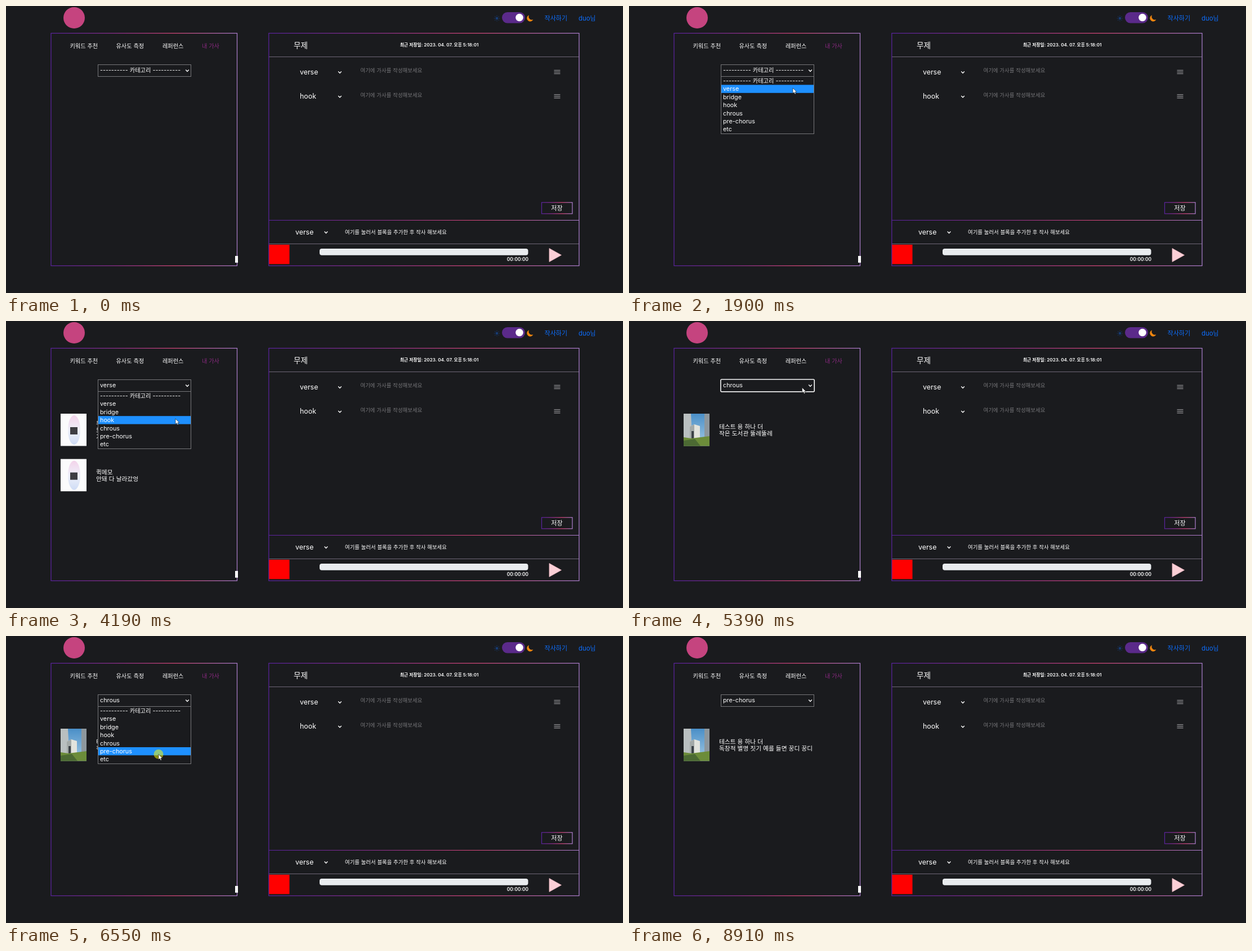
An HTML page for the animation above (8.98 s loop, 1096x511 px).

```html
<!DOCTYPE html>
<html lang="ko">
<head>
<meta charset="utf-8">
<title>Lyric editor</title>
<style>
  html, body { margin: 0; width: 100%; height: 100%; overflow: hidden; background: #1a1b1e; }
  svg { display: block; width: 100vw; height: 100vh; }
  text { font-family: Inter, "Noto Sans CJK KR", "Noto Sans CJK", sans-serif; fill: #fff; white-space: pre; }
  .hangul { font-size: .95em; }
</style>
</head>
<body>
<svg id="stage" viewBox="0 0 1096 511">
  <defs>
    <linearGradient id="neon">
      <stop offset="0" stop-color="#5b23a0"/>
      <stop offset=".33" stop-color="#8f2f93"/>
      <stop offset=".66" stop-color="#d8487c"/>
      <stop offset="1" stop-color="#ae7fd0"/>
    </linearGradient>
    <linearGradient id="pastel" x2="0" y2="1">
      <stop offset="0" stop-color="#f3d3ea"/>
      <stop offset=".5" stop-color="#eef0fa"/>
      <stop offset="1" stop-color="#cfdcf5"/>
    </linearGradient>
    <linearGradient id="sky" x2="0" y2="1">
      <stop offset="0" stop-color="#4a8fc8"/>
      <stop offset="1" stop-color="#a5cbe4"/>
    </linearGradient>
  </defs>
</svg>
<script>
const LOOP = 8980, ROW = 14.4, LIST_TOP = 126;
const stage = document.getElementById('stage');

const rect = (x, y, w, h, attrs) => `<rect x="${x}" y="${y}" width="${w}" height="${h}" ${attrs}/>`;
const path = (d, attrs) => `<path d="${d}" ${attrs}/>`;
const text = (x, y, size, content, attrs = '') =>
  `<text x="${x}" y="${y}" font-size="${size}" ${attrs}>` +
  content.replace(/[가-힣]+/g, '<tspan class="hangul">$&</tspan>') + '</text>';
const group = (id, content, attrs = '') => `<g id="${id}" ${attrs}>${content}</g>`;
const chevron = (x, y) => path(`M${x - 2.8} ${y - 1.4}l2.8 2.8l2.8-2.8`, 'fill="none" stroke="#fff" stroke-width="1.4"');
const burger = y => [-3, 0, 3].map(d => rect(973.5, y + d - .6, 11, 1.2, 'fill="#98989b"')).join('');
const frame = (x, y, w, h) => rect(x, y, w, h, 'fill="none" stroke="url(#neon)" stroke-width="1.2"');
const divider = (y, fill) => rect(467, y, 551, 1, `fill="${fill}"`);

const blankCover = y =>
  rect(97, y, 46, 57.5, 'fill="#fbfbfc"') +
  `<ellipse cx="121" cy="${y + 29}" rx="11" ry="26" fill="url(#pastel)"/>` +
  rect(114, y + 24, 13, 13, 'fill="#3d3d43"');

const photoCover = y => `<g transform="translate(97 ${y})">` +
  rect(0, 0, 46, 57.5, 'fill="url(#sky)"') +
  path('M0 0H13L14 20L11 44H0Z', 'fill="#b9bfc0"') +
  path('M37 0H46V46H37Z', 'fill="#8d979d"') +
  path('M11 23L19 19L29 22V44H11Z', 'fill="#e2e3dd"') +
  path('M11 23L19 19V44H11Z', 'fill="#a3a9a8"') +
  rect(14, 31, 4, 13, 'fill="#3c4247"') +
  path('M0 42L14 44L46 40V57.5H0Z', 'fill="#6c8c3a"') +
  path('M0 48L20 45L30 57.5H0Z', 'fill="#4c6a33"') + '</g>';

const song = (y, cover, ...lines) => cover(y) + lines.map((line, i) =>
  text(160, y + 32.9 + (i - (lines.length - 1) / 2) * 11.8, 11.3, line, 'font-weight="500"')).join('');

const options = ['---------- 카테고리 ----------', 'verse', 'bridge', 'hook', 'chrous', 'pre-chorus', 'etc'];
const songs = {
  1: song(165, blankCover, '무제', '모든 순간이 노래가 되어', '가만히 귀를 기울여') +
     song(245.7, blankCover, '퀵메모', '안돼 다 날라갔엉'),
  4: song(165, photoCover, '테스트 용 하나 더', '작은 도서관 뚤레뚤레'),
  5: song(165, photoCover, '테스트 용 하나 더', '독창적 별명 짓기 예를 들면 꿍디 꿍디')
};

const sunRays = Array.from({ length: 8 }, (_, i) =>
  `<path d="M0-3.6V-5.2" stroke="#173a70" transform="rotate(${i * 45})"/>`).join('');

const header =
  '<circle cx="121" cy="21" r="19" fill="#c5447f"/>' +
  `<g transform="translate(872 22)"><circle r="2.4" fill="#173a70"/>${sunRays}</g>` +
  rect(881, 11, 41, 19.5, 'rx="9.75" fill="#5b2a8a"') +
  '<circle cx="912" cy="20.5" r="6.8" fill="#fff"/>' +
  path('M929.2 16.2A5.8 5.8 0 1 0 936.4 24A5.6 5.6 0 0 1 929.2 16.2Z', 'fill="#f0860f"') +
  text(956.5, 25.8, 11.6, '작사하기', 'style="fill:#0d6efd"') +
  text(1017, 25.8, 11.4, 'duo님', 'style="fill:#0d6efd"');

const tabs = [[113.5, '키워드 추천'], [195.5, '유사도 측정'], [278, '레퍼런스'], [348, '내 가사']]
  .map(([x, label], i) => text(x, 74.8, 10.7, label, `font-weight="500" ${i === 3 ? 'style="fill:#8a2a80"' : ''}`)).join('');

const leftPanel = frame(80, 48.5, 330.5, 414) + tabs + rect(407, 445, 5, 12, 'fill="#fff"');

const block = (y, name) => text(522, y + 4, 12.4, name) + chevron(593, y + .3) +
  text(629.5, y + .6, 9.95, '여기에 가사를 작성해보세요', 'style="fill:#757578"') + burger(y - .2);

const rightPanel =
  divider(90, '#6f6878') + divider(381, 'url(#neon)') + divider(423, '#6f6878') +
  text(511, 74.8, 14.3, '무제') +
  text(700, 72, 8.15, '최근 저장일: 2023. 04. 07. 오후 5:18:01', 'font-weight="600"') +
  block(117.7, 'verse') + block(161, 'hook') +
  frame(951.5, 349.8, 54.5, 20) + text(968.3, 363.8, 11.7, '저장', 'font-weight="500"') +
  text(514, 406.7, 12.4, 'verse') + chevron(568.5, 403) +
  text(602, 405.8, 9.9, '여기를 눌러서 블록을 추가한 후 작사 해보세요') +
  rect(467, 425, 36.5, 34.5, 'fill="#f00"') +
  rect(557, 432, 370.5, 11.8, 'rx="4" fill="#e9ecef"') +
  text(928, 454, 8.3, '00:00:00', 'font-weight="600" text-anchor="end"') +
  path('M965 431.5L986.5 443.5L965 455.5Z', 'fill="#fbcfd6" stroke="#e8b4bf" stroke-width=".8"') +
  frame(466.8, 48.5, 551.2, 414);

const select =
  rect(163.5, 104.5, 165, 21, 'fill="#1a1b1e" stroke="#77777a"') +
  group('ring', rect(162.8, 103.8, 166.6, 22.2, 'rx="2" fill="none" stroke="#fff" stroke-width="1.3"')) +
  '<g id="value"></g>' + chevron(322, 115);

const popup = group('popup',
  rect(163.5, 125.5, 165, 102, 'fill="#1a1b1e" stroke="#77777a"') +
  rect(164, LIST_TOP, 164, ROW, 'id="highlight" fill="#1e90ff"') +
  options.map((label, i) => text(167, LIST_TOP + i * ROW + 11, 10.8, label)).join(''));

const pointer = group('pointer',
  '<circle id="click" r="8.5" fill="#ff0" fill-opacity=".5"/>' +
  path('M0 0V9.5L2.2 7.6L3.7 11L5.3 10.3L3.9 7H6.8Z', 'fill="#fff" stroke="#111" stroke-width=".6"'));

stage.insertAdjacentHTML('beforeend', header + leftPanel + rightPanel +
  Object.keys(songs).map(key => group('songs' + key, songs[key])).join('') + select + popup + pointer);

// Pointer stops: time, x, y
const stops = [
  [0, 1100, 520], [399, 1100, 520], [400, 1021, 504], [1220, 315, 114.5], [1690, 315, 114.5],
  [1900, 291, 146], [2020, 291, 149], [2920, 291, 149], [3310, 315, 117.5], [3840, 315, 117.5],
  [4190, 301, 174], [4680, 300, 187.5], [5060, 300, 187.5], [5390, 307.5, 118.5], [5600, 315, 117],
  [5750, 315, 117], [5890, 292, 146], [6150, 271, 210.5], [7340, 271, 210.5], [7960, 1023, 483],
  [8220, 1023, 483], [8290, 1080, 496], [8430, 1080, 496], [8570, 1100, 520], [LOOP, 1100, 520]
];
const openSpans = [[1220, 2360], [3310, 4800], [5680, 6620]];
const clickSpans = [[1220, 1290], [2290, 2360], [3380, 3510], [4680, 4800], [5680, 5750], [6550, 6690]];

const within = (spans, t) => spans.some(([from, to]) => t >= from && t < to);
const byId = id => document.getElementById(id);
const show = (id, on) => byId(id).setAttribute('visibility', on ? 'visible' : 'hidden');

function pointerAt(t) {
  const next = stops.findIndex(stop => stop[0] > t);
  const [t0, x0, y0] = stops[next - 1], [t1, x1, y1] = stops[next];
  const p = (t - t0) / (t1 - t0), eased = p * p * (3 - 2 * p);
  return [x0 + (x1 - x0) * eased, y0 + (y1 - y0) * eased];
}

let shown = -1;
function render(now) {
  const t = now % LOOP;
  const [x, y] = pointerAt(t);
  const selected = t < 2360 ? 0 : t < 4800 ? 1 : t < 6620 ? 4 : 5;
  const open = within(openSpans, t);
  const hovered = y > LIST_TOP ? Math.min(6, Math.floor((y - LIST_TOP) / ROW)) : selected;

  if (selected !== shown) {
    shown = selected;
    byId('value').innerHTML = text(167, 118.3, 10.8, options[selected]);
    for (const key in songs) show('songs' + key, +key === selected);
  }
  show('popup', open);
  show('ring', !open && t >= 2360 && t < 8910);
  show('click', within(clickSpans, t));
  byId('highlight').setAttribute('y', LIST_TOP + hovered * ROW);
  byId('pointer').setAttribute('transform', `translate(${x.toFixed(2)} ${y.toFixed(2)})`);
  requestAnimationFrame(tick);
}
const start = performance.now();
function tick() { render(performance.now() - start); }
tick();
</script>
</body>
</html>
```
